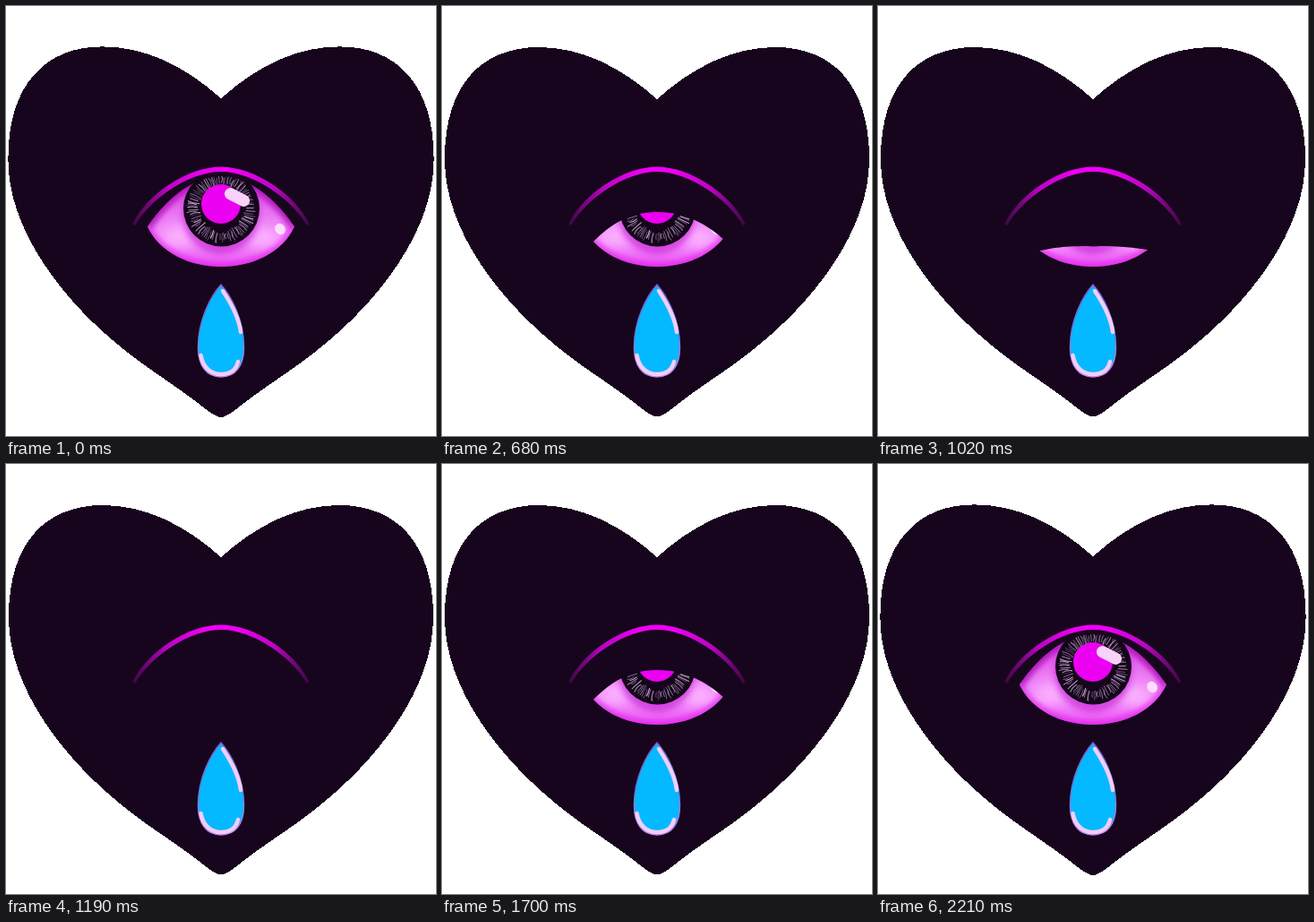
Write an HTML page that moves like this. It is 480 px wide and 480 px high and loops after 2.38 s.

```html
<!DOCTYPE html>
<html lang="en">
<head>
<meta charset="utf-8">
<title>Crying eye in a heart</title>
<style>
  html, body { margin: 0; width: 100%; height: 100%; overflow: hidden; background: #fff; }
  svg { display: block; width: 100vw; height: 100vh; }

  .heart, .lid { fill: #17051d; }
  .heart { stroke: #17051d; shape-rendering: crispEdges; animation: edge 2380ms step-end infinite; }
  .lid { animation: blink 2380ms step-end infinite; }

  @keyframes edge {
    0%, 92.8571%, 100% { stroke-width: 1.2px; }
    14.2857% { stroke-width: 0; }
  }

  @keyframes blink {
    0%, 92.8571%, 100% { d: path("M140 170H340V246L322 246C306 222 275 190 240 190C205 190 174 222 158 246L140 246Z"); }
    14.2857%, 85.7142% { d: path("M140 170H340V253L320 253C303 230 275 206 240 206C205 206 178 232 162 256L140 256Z"); }
    21.4285%, 78.5714% { d: path("M140 170H340V258L318 258C301 238 275 218 240 218C205 218 181 240 165 260L140 260Z"); }
    28.5714%, 71.4285% { d: path("M140 170H340V261L315 261C298 246 275 230 240 230C205 230 184 248 168 264L140 264Z"); }
    35.7142%, 64.2857% { d: path("M140 170H340V267L312 267C296 258 275 249 240 249C205 249 189 259 173 269L140 269Z"); }
    42.8571%, 57.1428% { d: path("M140 170H340V272L301 272C285 270 275 268 240 268C205 268 197 270 181 273L140 273Z"); }
    50% { d: path("M140 170H340V294L322 294C306 294 275 294 240 294C205 294 174 294 158 294L140 294Z"); }
  }
</style>
</head>
<body>
<svg viewBox="0 0 480 480">
  <defs>
    <linearGradient id="white" x1="0" y1="200" x2="0" y2="291" gradientUnits="userSpaceOnUse">
      <stop offset="0" stop-color="#d845e2"/>
      <stop offset=".4" stop-color="#ec7cf4"/>
      <stop offset=".7" stop-color="#f493fb"/>
      <stop offset="1" stop-color="#e94cf2"/>
    </linearGradient>
    <linearGradient id="crease" x1="141" y1="0" x2="339" y2="0" gradientUnits="userSpaceOnUse">
      <stop offset="0" stop-color="#38083f"/>
      <stop offset=".2" stop-color="#bc04c4"/>
      <stop offset=".4" stop-color="#ee00f4"/>
      <stop offset=".6" stop-color="#ee00f4"/>
      <stop offset=".8" stop-color="#bc04c4"/>
      <stop offset="1" stop-color="#38083f"/>
    </linearGradient>
    <linearGradient id="rim" x1="0" y1="310" x2="0" y2="415" gradientUnits="userSpaceOnUse">
      <stop offset="0" stop-color="#8a4fc0"/>
      <stop offset=".5" stop-color="#5a7fe0"/>
      <stop offset="1" stop-color="#d67bea"/>
    </linearGradient>
    <filter id="soft" x="-30%" y="-30%" width="160%" height="160%"><feGaussianBlur stdDeviation="3"/></filter>
    <filter id="softer" x="-50%" y="-50%" width="200%" height="200%"><feGaussianBlur stdDeviation="7"/></filter>
    <clipPath id="almond">
      <path d="M158 246C171 275 205 291 240 291C275 291 309 275 322 246C306 222 275 188 240 188C205 188 174 222 158 246Z"/>
    </clipPath>
  </defs>

  <path class="heart" d="M240 104C200 68 155 46 108 46C46 46 3 86 3 171C3 250 64 330 137 387C165 409 190 423 224 450Q235 458.500 240 458.500Q245 458.500 256 450C290 423 315 409 343 387C416 330 477 250 477 171C477 86 434 46 372 46C325 46 280 68 240 104Z"/>

  <g clip-path="url(#almond)">
    <rect x="150" y="180" width="180" height="115" fill="url(#white)"/>
    <g fill="#fbb2ff" filter="url(#softer)">
      <ellipse cx="192" cy="256" rx="16" ry="10"/>
      <ellipse cx="288" cy="258" rx="16" ry="10"/>
    </g>
    <path d="M158 246C171 275 205 291 240 291C275 291 309 275 322 246" fill="none" stroke="#e012ec" stroke-width="5" filter="url(#soft)"/>
    <path d="M158 246C174 222 205 190 240 190C275 190 306 222 322 246" fill="none" stroke="#b00cba" stroke-width="9" filter="url(#soft)"/>
    <ellipse cx="240" cy="232" rx="43" ry="45" fill="#c21fd2" opacity=".6" filter="url(#soft)"/>
    <circle cx="240.500" cy="226" r="42.500" fill="#14051a"/>
    <g id="fibres" fill="none" stroke="#d6b4e0" stroke-linecap="round"></g>
    <circle cx="240" cy="221" r="22" fill="#ec00f2"/>
    <rect x="243" y="207" width="30" height="13" rx="6.500" fill="#f8d2fa" transform="rotate(27 258 213.500)"/>
    <ellipse cx="306" cy="249" rx="5.500" ry="6.500" fill="#ffdcff" transform="rotate(-35 306 249)"/>
  </g>
  <path class="lid" d="M140 170H340V246L322 246C306 222 275 190 240 190C205 190 174 222 158 246L140 246Z"/>
  <path fill="url(#crease)" d="M141.500 243C157 210 203 179.500 240 179.500C277 179.500 323 210 338.500 243L336 245C318 214 275 185 240 185C205 185 162 214 144 245Z"/>

  <path d="M240 311C229 323 214.500 350 214.500 381C214.500 402 224 414 240 414C256 414 265.500 402 265.500 381C265.500 350 251 323 240 311Z" fill="#04b9ff" stroke="url(#rim)" stroke-width="1.500"/>
  <g fill="none" stroke="#f3cdfb" stroke-linecap="round">
    <path d="M242 318C250 330 260 347 262 364" stroke-width="4.500"/>
    <path d="M217.500 390C220 404 229 411 240 411C250 411 257 406 259 397" stroke-width="4.500"/>
  </g>
</svg>
<script>
  let seed = 7;
  const rand = () => (seed = seed * 16807 % 2147483647) / 2147483647;
  const polar = (r, a) => (240.5 + r * Math.cos(a)).toFixed(1) + " " + (226 + r * Math.sin(a)).toFixed(1);

  const count = 90;
  let fibres = "";
  for (let i = 0; i < count; i++) {
    const a = (i + rand() * 0.7) / count * Math.PI * 2;
    const inner = 24 + rand() * 5, outer = 34 + rand() * 5;
    const bend = (rand() - 0.5) * 0.14;
    fibres += `<path d="M${polar(inner, a)}Q${polar((inner + outer) / 2, a + bend)} ${polar(outer, a)}"
      stroke-width="${(0.6 + rand() * 0.6).toFixed(2)}" opacity="${(0.35 + rand() * 0.6).toFixed(2)}"/>`;
  }
  document.getElementById("fibres").innerHTML = fibres;
</script>
</body>
</html>
```
